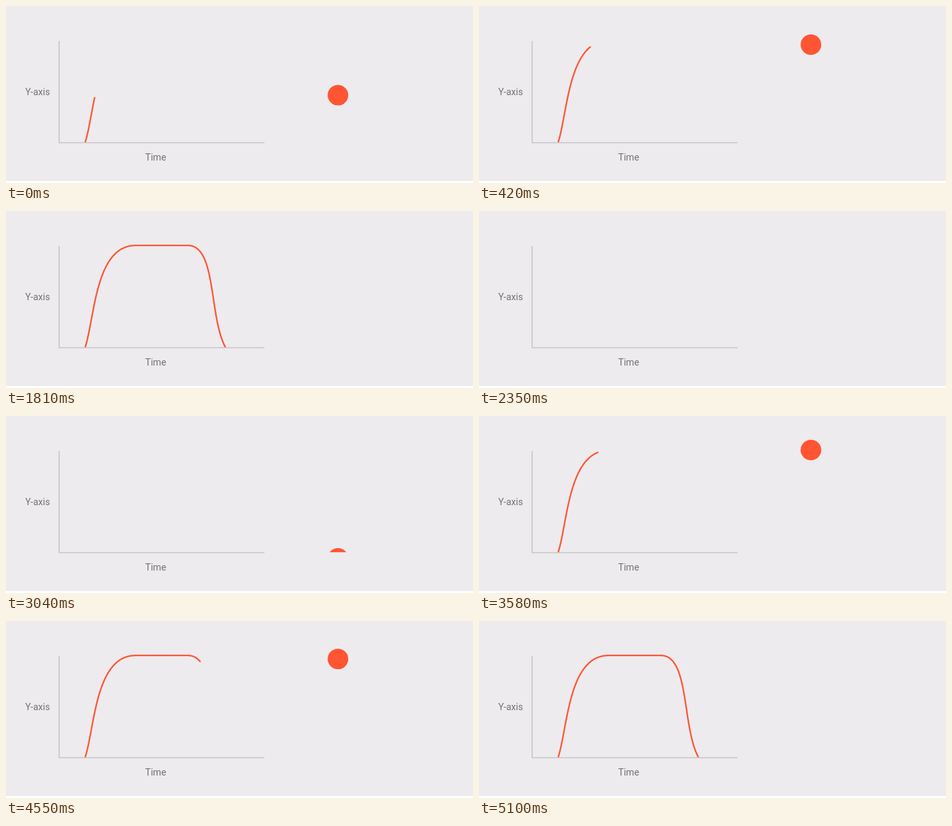
An HTML page that plays this animation: 703 px wide and 268 px high, repeating every 5350 ms.

```html
<!DOCTYPE html>
<html lang="en">
<head>
<meta charset="utf-8">
<title>Easing curve</title>
<style>
  html, body { margin: 0; width: 100%; height: 100%; overflow: hidden; background: #fff; }
  svg { display: block; }
  text { font: 14px Roboto, sans-serif; fill: #737174; }
</style>
</head>
<body>
<svg width="703" height="268" viewBox="0 0 703 268">
  <clipPath id="stage"><rect width="703" height="206.2"/></clipPath>
  <rect width="703" height="265" fill="#eeebee"/>
  <path d="M80 53V207H389" fill="none" stroke="#c7c5c9" stroke-width="1.6"/>
  <text x="29" y="135">Y-axis</text>
  <text x="209.6" y="234.3">Time</text>
  <g clip-path="url(#stage)">
    <path id="curve" fill="none" stroke="#ff5533" stroke-width="2.3" stroke-linecap="round" stroke-linejoin="round"/>
    <circle id="ball" cx="499.7" r="15.5" fill="#ff5533"/>
  </g>
</svg>
<script>
const LOOP = 5350, STEP = LOOP / 39, DELAY = 10;
const TOP = 52.2, BASE = 228;

// The curve is drawn twice per loop: first step, x at that step, pixels per step.
const PASSES = [
  { first: -1, x: 116.5, speed: 17 },
  { first: 22, x: 114, speed: 16.2 }
];
const FADE_END = 18;

const bezier = (a, b, c, d, s) => {
  const r = 1 - s;
  return r * r * r * a + 3 * r * r * s * b + 3 * r * s * s * c + s * s * s * d;
};

const sample = (xs, from, to) => Array.from({ length: 401 }, (_, i) =>
  [bezier(...xs, i / 400), bezier(from, from, to, to, i / 400)]);

const points = [
  ...sample([102, 138, 118, 195], BASE, TOP),
  ...sample([274, 329, 294.5, 362], TOP, BASE)
];

const curve = document.getElementById('curve');
const ball = document.getElementById('ball');

function draw(time) {
  // The picture moves in even steps and holds between them.
  const step = Math.max(0, Math.floor((time % LOOP - DELAY) / STEP));
  const pass = PASSES.findLast(p => p.first <= step);
  const age = step - pass.first;
  const x = pass.x + pass.speed * age;

  const trail = points.filter(p => p[0] <= x);
  const y = trail[trail.length - 1][1];
  trail.push([Math.min(x, points[points.length - 1][0]), y]);

  curve.setAttribute('d', 'M' + trail.map(p => p.map(n => n.toFixed(2)).join(' ')).join('L'));
  curve.setAttribute('opacity', Math.min(1, Math.max(0, (FADE_END - age) / 2)));
  ball.setAttribute('cy', y - 3.7);
}

const start = performance.now();
function frame() {
  draw(performance.now() - start);
  requestAnimationFrame(frame);
}
frame();
</script>
</body>
</html>
```
